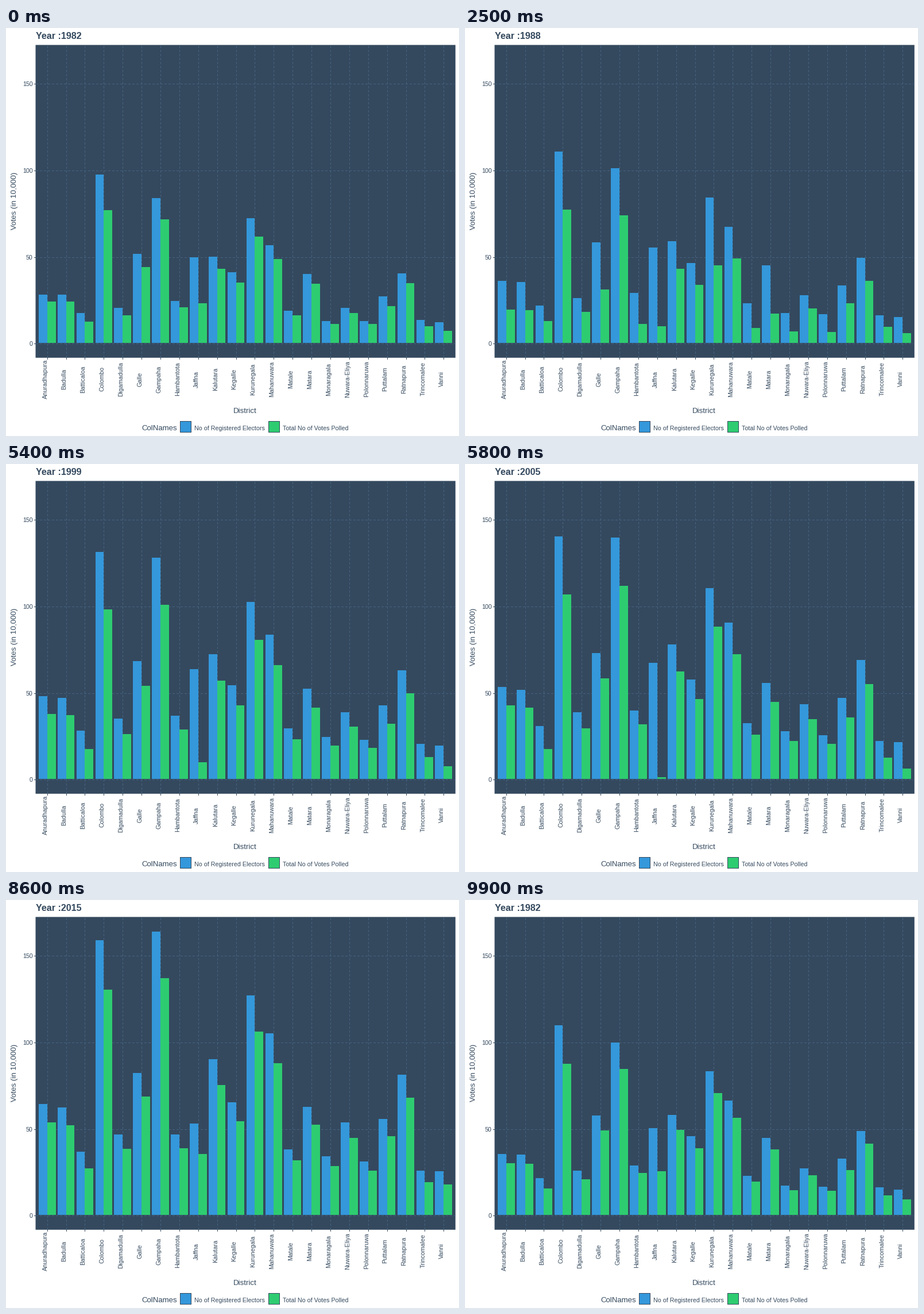
Animation, 789 px wide and 710 px high, one loop 10 s. Source, as a matplotlib script:

```python
import matplotlib.pyplot as plt
import numpy as np
from matplotlib.animation import FuncAnimation
from matplotlib.patches import Rectangle

W, H, DPI = 789, 710, 100
PX = 72 / DPI
INK, GRID, BLUE, GREEN = "#34495e", "#46627f", "#3498db", "#2ecc71"
LEFT, RIGHT, TOP, BOTTOM = 52, 782, 30, 573
FRAMES, STEPS = 100, 5
SMALL, MEDIUM, LARGE = 10.6, 13.2, 16.1

YEARS = np.array([1982, 1988, 1994, 1999, 2005, 2010, 2015])
STARTS = [9, 24, 39, 53, 67, 81, 95]  # last still frame of each year

# Electors in the first and last year; the register grows steadily in between.
ELECTORS = {
    "Anuradhapura": (28, 64), "Badulla": (28, 62), "Batticaloa": (17.4, 36.5),
    "Colombo": (97.2, 158.8), "Digamadulla": (20.4, 46.6), "Galle": (51.4, 82),
    "Gampaha": (83.6, 163.8), "Hambantota": (24.2, 46.4), "Jaffna": (49.5, 75),
    "Kalutara": (50, 90), "Kegalle": (40.8, 65), "Kurunegala": (72, 126.7),
    "Mahanuwara": (56.6, 105), "Matale": (18.8, 38), "Matara": (40, 62.4),
    "Monaragala": (12.8, 34), "Nuwara-Eliya": (20.4, 53.4),
    "Polonnaruwa": (12.8, 30.8), "Puttalam": (27, 55.4),
    "Ratnapura": (40.3, 81.1), "Trincomalee": (13.5, 25.8), "Vanni": (12, 25.4),
}
DISTRICTS = list(ELECTORS)

# Turnout per year, shared by the districts of a region.
CALM = np.array([0.855, 0.715, 0.775, 0.785, 0.80, 0.79, 0.835])
CAPITAL = np.array([0.79, 0.69, 0.715, 0.745, 0.76, 0.765, 0.82])
EAST = np.array([0.71, 0.57, 0.63, 0.64, 0.56, 0.67, 0.74])
NORTH = np.array([0.465, 0.22, 0.03, 0.19, 0.015, 0.26, 0.665])
UNREST = YEARS == 1988
REGIONS = [
    ("Anuradhapura Badulla Galle Kurunegala", np.where(UNREST, 0.47, CALM)),
    ("Hambantota Matale Matara Monaragala Polonnaruwa",
     np.where(UNREST, 0.27, CALM)),
    ("Colombo Digamadulla Puttalam", CAPITAL),
    ("Batticaloa Trincomalee", EAST),
    ("Jaffna", NORTH),
    ("Vanni", (NORTH + EAST) / 2),
]
TURNOUT = {name: curve for names, curve in REGIONS for name in names.split()}

growth = (YEARS - YEARS[0]) / (YEARS[-1] - YEARS[0])
electors = np.array([a + (b - a) * growth for a, b in ELECTORS.values()])
electors[DISTRICTS.index("Jaffna"), -1] = 53  # register revised
polled = electors * [TURNOUT.get(name, CALM) for name in DISTRICTS]
states = np.concatenate([electors, polled]).T

# The scales leave 5 % of room around the data and 0.6 of a slot at the sides.
SLOT = (RIGHT - LEFT) / (len(DISTRICTS) + 0.2)
PEAK = states.max()
UNIT = (BOTTOM - TOP) / (1.1 * PEAK)


def slot_x(i):
    return LEFT + (i + 0.6) * SLOT


def value_y(v):
    return BOTTOM - (v + 0.05 * PEAK) * UNIT


plt.rcParams["font.family"] = "Liberation Sans"
fig = plt.figure(figsize=(W / DPI, H / DPI), dpi=DPI, facecolor="white")
ax = fig.add_axes([0, 0, 1, 1])
ax.set(xlim=(0, W), ylim=(H, 0))
ax.axis("off")


def rect(x0, y0, x1, y1, color, z=1, snap=True):
    return ax.add_patch(Rectangle((x0, y0), x1 - x0, y1 - y0, facecolor=color,
                                  linewidth=0, snap=snap, zorder=z))


def line(x0, y0, x1, y1, color, dash="-"):
    ax.plot([x0, x1], [y0, y1], color=color, lw=PX, ls=dash, zorder=2,
            antialiased=False, solid_capstyle="butt", dash_capstyle="butt")


def label(x, y, text, px, **style):
    return ax.text(x, y, text, fontsize=px * PX, color=INK, va="baseline",
                   rotation_mode="anchor", **style)


# The panel has a thin outline in its own colour.
rect(LEFT - 0.5, TOP - 0.5, RIGHT + 0.8, BOTTOM + 0.8, INK, snap=False)
DASHED = (0, (4, 4))
for v in (0, 50, 100, 150):
    y = round(value_y(v)) + 0.5
    line(LEFT, y, RIGHT, y, GRID, DASHED)
    line(LEFT - 3, y, LEFT, y, INK)
    label(46.5, y + 4.3, str(v), SMALL, ha="right")
for i, name in enumerate(DISTRICTS):
    x = round(slot_x(i)) + 0.5
    line(x, BOTTOM, x, TOP, GRID, DASHED)
    line(x, BOTTOM, x, BOTTOM + 3, INK)
    label(slot_x(i), 611, name, SMALL, ha="center", rotation=90)

title = label(52, 19, "", LARGE, weight="bold")
label(416.5, 669.5, "District", MEDIUM, ha="center")
label(18, 301, "Votes (in 10,000)", MEDIUM, ha="center", rotation=90)
label(236, 700, "ColNames", MEDIUM)
for x, color, text in ((303, BLUE, "No of Registered Electors"),
                       (457, GREEN, "Total No of Votes Polled")):
    rect(x, 684, x + 20, 704, INK)
    rect(x + 1, 685, x + 19, 703, color, 2)
    label(x + 25.3, 699.5, text, SMALL)

BASE = round(value_y(0))
bars = []
for side, color in ((-0.45, BLUE), (0, GREEN)):
    for i in range(len(DISTRICTS)):
        x = slot_x(i) + side * SLOT
        bars.append(rect(round(x), BASE, round(x + 0.45 * SLOT), BASE, color, 3))


def pose(frame):
    """Year index and linear progress towards the following year."""
    for k, start in enumerate(STARTS):
        if frame < start + STEPS:
            return k, max(0, frame - start) / STEPS
    return 0, 0


def draw(frame):
    k, t = pose(frame)
    nxt = (k + 1) % len(YEARS)
    for bar, v in zip(bars, (1 - t) * states[k] + t * states[nxt]):
        top = round(value_y(v))
        bar.set_y(top)
        bar.set_height(BASE - top)
    title.set_text(f"Year :{YEARS[nxt if t > 0.5 else k]}")
    return bars + [title]


anim = FuncAnimation(fig, draw, frames=FRAMES, interval=100, repeat=True,
                     repeat_delay=0, blit=False)
plt.show()
```
